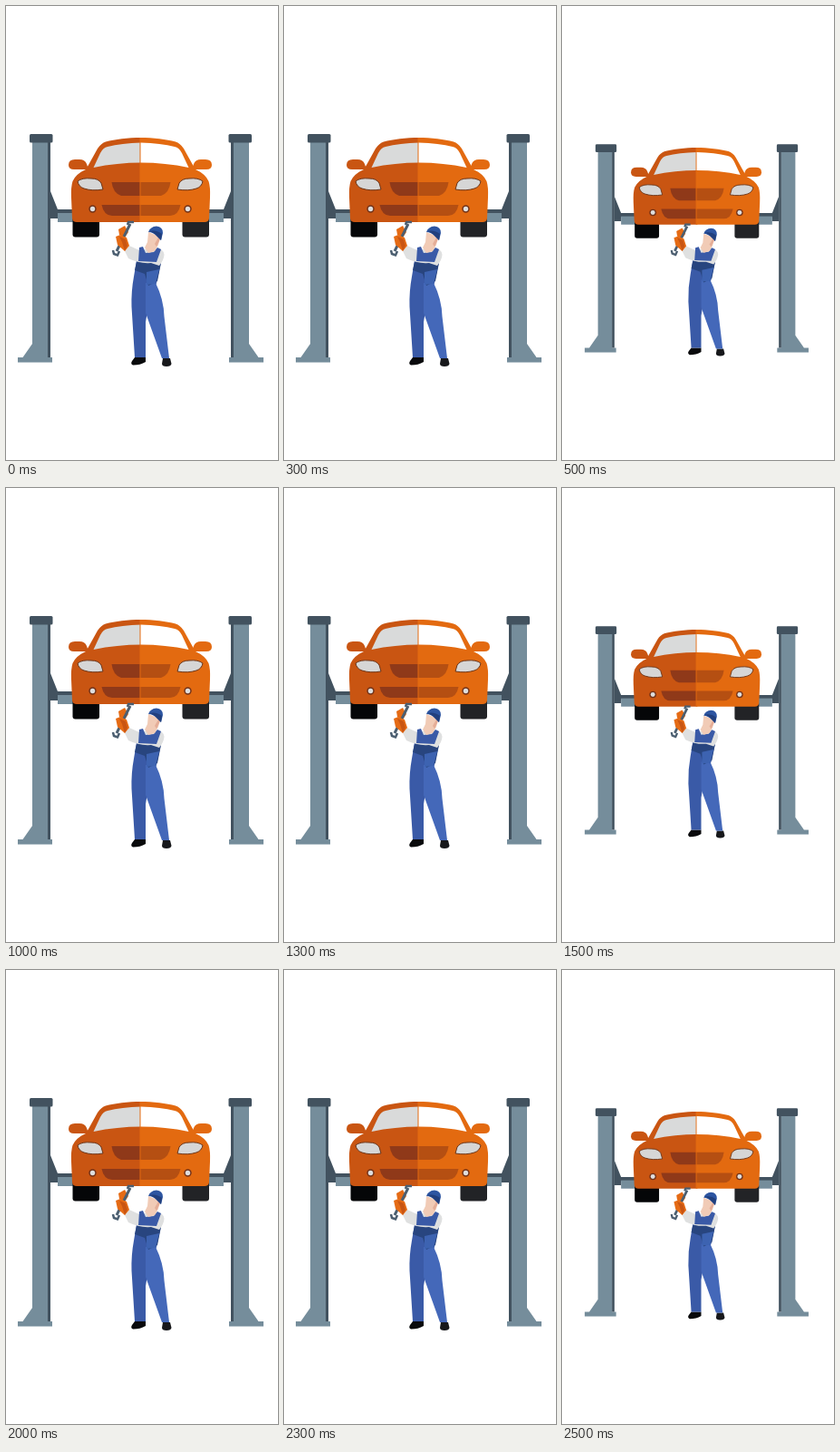
Recreate the animation shown at these times as an HTML page. Size 300 by 500 pixels, loop 3000 ms.

```html
<!DOCTYPE html>
<html lang="en">
<head>
<meta charset="utf-8">
<title>Car lift</title>
<style>
  html, body { margin: 0; width: 100%; height: 100%; overflow: hidden; background: #fff; }
  svg { display: block; width: 300px; height: 500px; }
  .steel { fill: #758d9b; }
  .iron { fill: #42525f; }
  .lamp { fill: #d6d6d6; stroke: #6b3519; stroke-width: 1; }
</style>
</head>
<body>
<svg viewBox="0 0 300 500">
  <defs>
    <g id="post">
      <path class="iron" d="M49 204L57 224H74V229H57V234H49Z"/>
      <path class="steel" d="M57 228H76V238H57Z"/>
      <path class="steel" d="M29 150H46V387H51V392.5H13V387H18.5L29 372Z"/>
      <path class="iron" d="M46 150H49V387H46Z"/>
      <rect class="iron" x="26" y="141" width="25.5" height="9.5" rx="1.5"/>
    </g>
    <path id="half" d="M149.5 145C134 145 120 147 110 149.5Q105 151 101 157L91 175
      L88 180Q77 185 73.5 193Q71.5 199 72 211L73 234Q73.5 238 78 238H149.5Z"/>
    <path id="mirror" d="M91 180H75Q69 180 69 175Q69 169 76 169H81Q87 169 89 174Z"/>
    <path id="glass" d="M149.5 150.5Q127 151 112 155Q107 156 104 162L96.500 178Q122 172.500 149.5 172.500Z"/>
    <path id="upperGrille" d="M149.500 194H116.500Q118 206 127 209H149.500Z"/>
    <path id="lowerGrille" d="M149.500 219H105.500Q108 231 117 231H149.500Z"/>
    <g id="lights">
      <path class="lamp" d="M79 193Q84 189 94 190Q102 190 105 195L107 202Q95 204 86 201Q80 199 79 193Z"/>
      <circle cx="95.500" cy="223.500" r="4.200" fill="#74341a"/>
      <circle cx="95.500" cy="223.500" r="2.700" fill="#dedede"/>
    </g>
  </defs>

  <g id="scene">
    <use href="#post"/>
    <use href="#post" transform="matrix(-1 0 0 1 297 0)"/>

    <rect x="73.500" y="232" width="29.500" height="22.500" rx="3" fill="#050608"/>
    <rect x="194.500" y="232" width="29.500" height="22.500" rx="3" fill="#222326"/>

    <g fill="#c95512">
      <use href="#mirror"/>
      <use href="#half"/>
      <use href="#glass" fill="#d9dada"/>
      <use href="#upperGrille" fill="#8f3919"/>
      <use href="#lowerGrille" fill="#8f3919"/>
    </g>
    <g fill="#e36a10" transform="matrix(-1 0 0 1 298 0)">
      <use href="#mirror" x="2"/>
      <use href="#half" x="1"/>
      <use href="#glass" fill="#fff"/>
      <use href="#upperGrille" fill="#b54f12"/>
      <use href="#lowerGrille" fill="#b54f12"/>
    </g>
    <use href="#lights"/>
    <use href="#lights" transform="matrix(-1 0 0 1 296 0)"/>

    <g id="mechanic">
      <path fill="#090a0c" d="M142 387H154V392Q148 395.500 140 395.500Q137 394 139 391Z"/>
      <path fill="#17181b" d="M173 388H181L182.500 394Q182 397 177 397Q172 397 172 394Z"/>
      <path fill="#3a5aa7" d="M144 280L171 282L166 305L157 330L154 348V387H142L138.500 331Q138 314 141 298Z"/>
      <path fill="#4468b9" d="M154 305H165Q174 323 174.500 342L180 388H172L154 338Z"/>
      <path fill="#28457f" d="M144 282L171 283L167 303L157 308L153 295L142 291Z"/>
      <path fill="#3d63b1" d="M155 293L169 290L165 306L155 307Z"/>
      <path fill="#dfe0e0" d="M131 270L136 264L147 269L164 266Q174 267 174.500 274Q174 280 169 286L160 283Q147 284 135 278Z"/>
      <path fill="#3a5aa7" d="M147 266L151 265L154 272L163 271L167 266L171 268L166 282L146 281Z"/>
      <path fill="#f1cbb6" d="M157 249L170 254L168 263L164 270L157 272L153 266L156 260Z"/>
      <path fill="#e5ad97" d="M168 255L170 257L166 265L164 262Z"/>
      <path fill="#2d55a1" d="M157 249Q159 243 166 242.500Q173 243 173 250L171 258L167 254Q162 249 157 249Z"/>
      <path fill="#213f7d" d="M158 248Q166 246 172 251L171 258L167 254Q163 249 158 248Z"/>
      <path fill="#e56b15" d="M124 246L131 242L135 249L131 255L125 252Z"/>
      <path d="M122 270L137 240" stroke="#4b5e70" stroke-width="3"/>
      <path fill="none" stroke="#4b5e70" stroke-width="2.500" d="M118 269L119 273L123 274.500L125 270M134 241L135 238H141"/>
      <path fill="#e56b15" d="M121 254L126 252L133 255L136 264L131 270L123 263Z"/>
      <path fill="#c95512" d="M125 254L132 257L134 264L131 270L128 260Z"/>
    </g>
  </g>
</svg>
<script>
  const scene = document.getElementById('scene');
  const cx = 148.5, cy = 268.7, small = 0.911, beat = 500;

  function draw(now) {
    const scale = Math.floor(now / beat) % 2 ? small : 1;
    scene.setAttribute('transform',
      `translate(${cx} ${cy}) scale(${scale}) translate(${-cx} ${-cy})`);
    requestAnimationFrame(() => draw(performance.now() - start));
  }

  const start = performance.now();
  draw(0);
</script>
</body>
</html>
```
